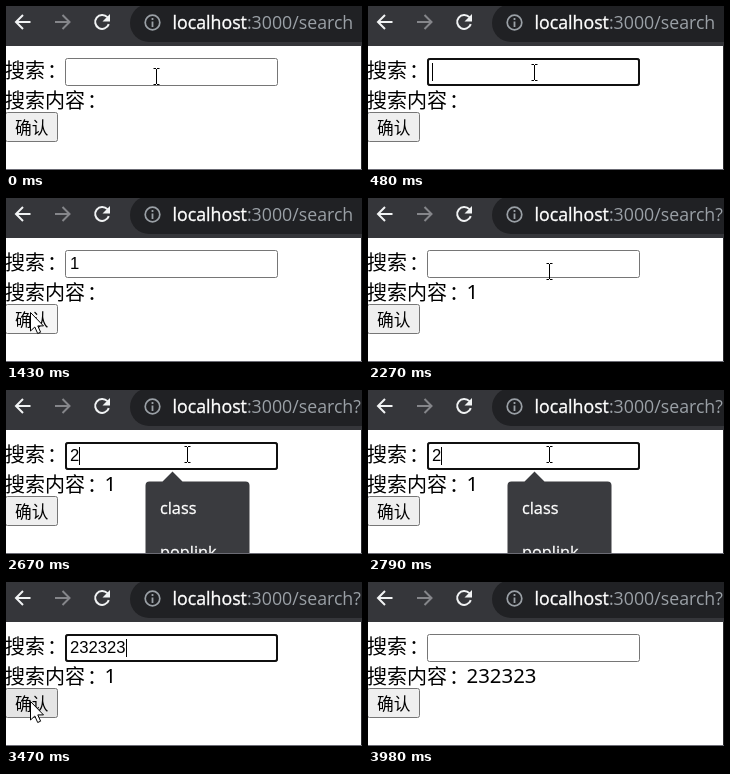
Animation, 356 px wide and 164 px high, one loop 4.78 s. Source, as an HTML page:

```html
<!DOCTYPE html>
<html lang="zh-CN">
<head>
<meta charset="utf-8">
<title>搜索</title>
<style>
  html, body { margin: 0; width: 100%; height: 100%; overflow: hidden; background: #fff; }
  svg { display: block; width: 356px; height: 164px; }
  text { white-space: pre; }
  .url { font: 17.75px "Open Sans", "Noto Sans", sans-serif; fill: #9aa0a6; }
  .host { fill: #fff; stroke: #fff; stroke-width: .35; }
  .label { font: 350 20px "Noto Sans CJK SC", "Noto Sans CJK", sans-serif; }
  .digits { font: 20.4px "Noto Sans", "Open Sans", sans-serif; }
  .typed { font: 16.67px "Liberation Sans", Arial, sans-serif; }
  .caption { font: 350 16.67px "Noto Sans CJK SC", "Noto Sans CJK", sans-serif; }
  .hint { font: 16.3px "Open Sans", "Noto Sans", sans-serif; fill: #fff; stroke: #fff; stroke-width: .3; }
  .icon { fill: none; stroke: #f1f3f4; stroke-width: 2; }
  .dim { stroke: #85868a; }
</style>
</head>
<body>
<svg viewBox="0 0 356 164">
  <rect width="356" height="164" fill="#fff"/>

  <!-- browser toolbar -->
  <rect width="356" height="40" fill="#35363a"/>
  <rect x="124" y="-2" width="260" height="38" rx="19" fill="#202124"/>
  <path class="icon" d="M24.500 16H10M17 9l-7 7 7 7"/>
  <path class="icon dim" d="M49 16h14.500M56.500 9l7 7-7 7"/>
  <path class="icon" d="M101.400 11.200A7 7 0 1 0 102.800 18.200"/>
  <path d="M104 8v7.500h-7.500z" fill="#f1f3f4"/>
  <circle cx="146.500" cy="16.500" r="7.300" fill="none" stroke="#9aa0a6" stroke-width="1.700"/>
  <path d="M146.500 12v2M146.500 15.500v5.500" stroke="#9aa0a6" stroke-width="1.800"/>
  <text class="url" x="166.500" y="22.500"><tspan class="host">localhost</tspan>:3000/search<tspan id="query"></tspan></text>

  <!-- page -->
  <text class="label" x="-1" y="71.500">搜索<tspan dx="2">：</tspan></text>
  <rect id="box" x="59.500" y="52.500" width="212" height="27" rx="2" fill="#fff" stroke="#767676"/>
  <rect id="ring" x="60" y="53" width="211" height="26" rx="2" fill="#fff" stroke="#101010" stroke-width="2"/>
  <text id="typed" class="typed" x="64" y="71"></text>
  <rect id="caret" y="57" width="1" height="18"/>
  <text class="label" x="-1" y="101.500">搜索内容<tspan dx="2">：</tspan></text>
  <text id="result" class="digits" x="98.500" y="101"></text>
  <rect id="button" x="-0.500" y="106.500" width="52" height="29" rx="2" stroke="#767676"/>
  <text class="caption" x="9" y="128">确认</text>

  <!-- autofill popup -->
  <g id="popup">
    <path d="M139.500 170V95.500a4 4 0 0 1 4-4h13l10-10 10 10h63a4 4 0 0 1 4 4v74.500z" fill="#3a3b3f"/>
    <text class="hint" x="154" y="124">class</text>
    <text class="hint" x="154" y="168">poplink</text>
  </g>

  <path d="M355.500 40v124" stroke="#2b2b2e"/>
  <path d="M0 163.500h356" stroke="#6b6b74"/>

  <!-- pointers, hot spot at the origin -->
  <path id="arrow" d="M.5.500v18.500l4.300-4 2.900 6.500 2.900-1.300-2.800-6.300h5.700z" fill="#fff" stroke="#000"/>
  <path id="beam" d="M-3-7.500h2.500M.5-7.500H3M0-7V8M-3 8.500h2.500M.5 8.500H3" fill="none" stroke="#000"/>
</svg>
<script>
  const LOOP = 4780;
  const part = Object.fromEntries(
    [...document.querySelectorAll("[id]")].map(el => [el.id, el]));

  // pointer stops: time, x, y
  const stops = [
    [120, 150, 70], [440, 166, 66], [700, 166, 66], [990, 81, 101],
    [1190, 26, 113], [1280, 24, 114], [1600, 24, 114], [1940, 110, 112],
    [2270, 181, 73], [2340, 181, 64], [2800, 181, 64], [3110, 114, 102],
    [3200, 106, 105], [3470, 24, 119], [3770, 24, 119], [3980, 30, 190]
  ];

  // each visit to the field: focus, first key, blur, submit
  const visits = [
    { focus: 480, key: 670, blur: 1430, submit: 1520 },
    { focus: 2310, key: 2670, blur: 3680, submit: 3770 }
  ];

  const keys = [
    [670, "1"], [1520, ""],
    [2670, "2"], [2800, "23"], [2930, "232"], [3060, "2323"],
    [3200, "23232"], [3320, "232323"], [3770, ""]
  ];
  const results = [[1520, "1"], [3770, "232323"]];

  const clamp = v => Math.min(1, Math.max(0, v));
  const ramp = (t, from, to) => clamp((t - from) / (to - from));
  const latest = (list, t) => list.filter(([at]) => at <= t).pop();
  const textAt = (list, t) => (latest(list, t) || [0, ""])[1];
  const show = (el, on) => el.setAttribute("visibility", on ? "visible" : "hidden");

  function pointerAt(t) {
    const a = latest(stops, t) || stops[0];
    const b = stops[stops.indexOf(a) + 1] || a;
    const p = a === b ? 0 : ramp(t, a[0], b[0]);
    const e = p * p * (3 - 2 * p);
    return [1, 2].map(i => Math.round(a[i] + (b[i] - a[i]) * e));
  }

  const within = (x, y, l, t, r, b) => x >= l && x <= r && y >= t && y <= b;

  function draw(t) {
    const value = textAt(keys, t);
    const visit = visits.find(v => t >= v.focus && t < v.blur);
    const pressed = visits.some(v => t >= v.blur && t < v.submit);

    part.query.textContent = t >= visits[0].submit ? "?" : "";
    part.result.textContent = textAt(results, t);
    part.typed.textContent = value;
    show(part.ring, visit);

    // the caret blinks from the last key or click
    const since = visit ? t - Math.max(visit.focus, (latest(keys, t) || [0])[0]) : 0;
    show(part.caret, visit && since % 1040 < 520);
    part.caret.setAttribute("x", 64 + Math.round(value.length * 9.27));

    const opacity = visit
      ? ramp(t, visit.focus + 10, visit.focus + 140) * (1 - ramp(t, visit.key + 310, visit.key + 435))
      : 0;
    part.popup.setAttribute("opacity", opacity);

    const [x, y] = pointerAt(t);
    const overText = within(x, y, 59, 52, 272, 80)
      || within(x, y, 0, 84, 99, 104) || within(x, y, 0, 54, 58, 76);
    const hover = within(x, y, 0, 107, 52, 136);
    part.button.setAttribute("fill", pressed ? "#f5f5f5" : hover ? "#e5e5e5" : "#efefef");
    show(part.beam, overText);
    show(part.arrow, !overText);
    part.beam.setAttribute("transform", `translate(${x + 0.5} ${y})`);
    part.arrow.setAttribute("transform", `translate(${x} ${y})`);
  }

  const start = performance.now();
  function tick() {
    draw((performance.now() - start) % LOOP);
    requestAnimationFrame(tick);
  }
  tick();
</script>
</body>
</html>
```
